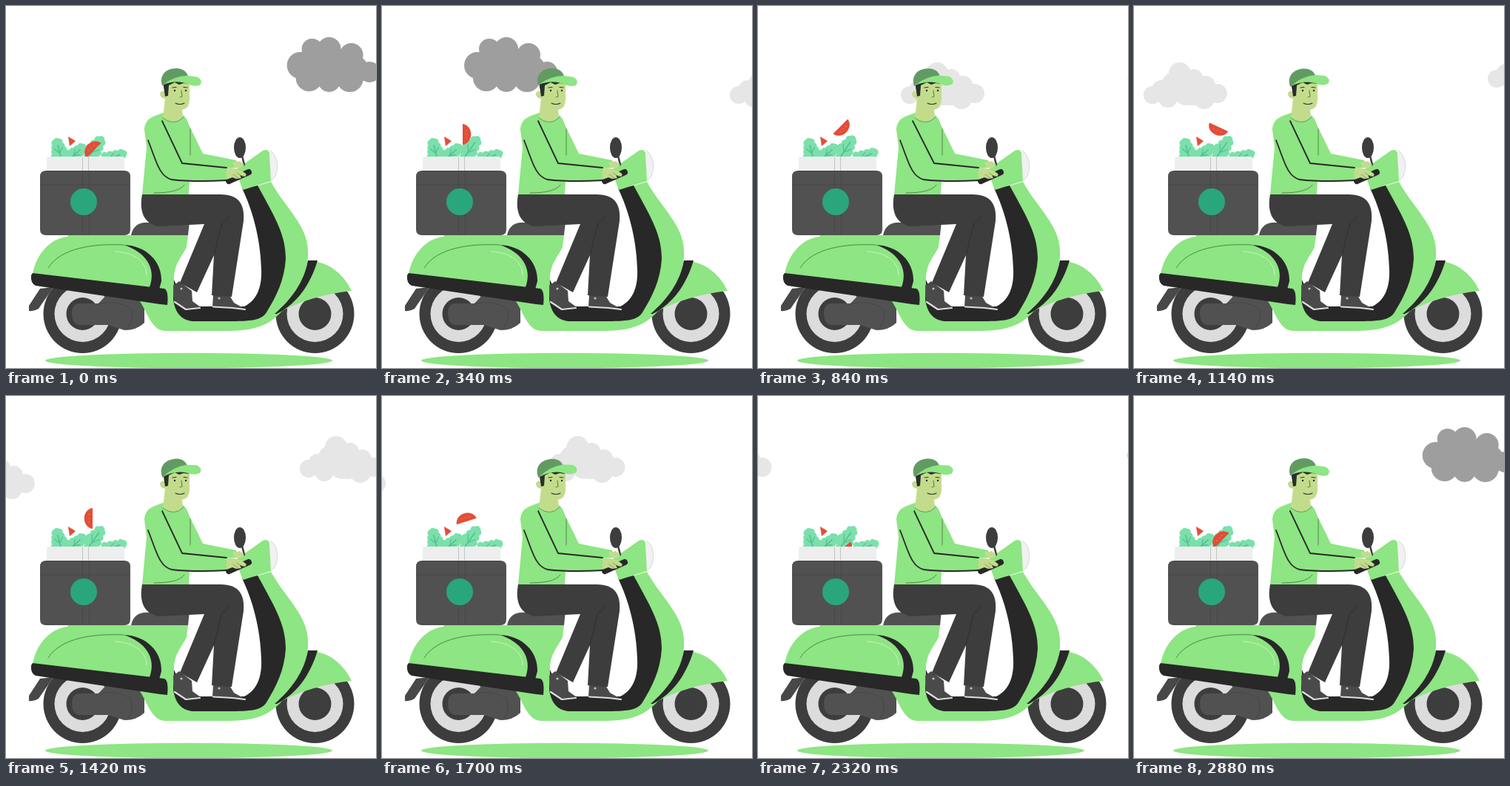
Recreate the animation shown at these times as an HTML page with a canvas. Size 500 by 488 pixels, loop 2900 ms.

```html
<!DOCTYPE html>
<html lang="en">
<head>
<meta charset="utf-8">
<title>Scooter delivery</title>
<style>
html, body { margin: 0; width: 100%; height: 100%; overflow: hidden; background: #fff; }
canvas { display: block; width: 500px; height: 488px; }
</style>
</head>
<body>
<canvas id="stage" width="500" height="488"></canvas>
<script>
const ctx = document.getElementById('stage').getContext('2d');
const LOOP = 2900;
const GREEN = '#8ee583', DARK = '#3d3d3d', BLACK = '#282828', GREY = '#515151';
const SKIN = '#c3dc8c', LEAF = '#7be0ab', RIB = '#55bd90', RED = '#e24e38', TEAL = '#2aa67c';

function fill(d, color) {
  ctx.fillStyle = color;
  ctx.fill(new Path2D(d));
}
function line(d, color, width = 1) {
  ctx.strokeStyle = color;
  ctx.lineWidth = width;
  ctx.lineCap = ctx.lineJoin = 'round';
  ctx.stroke(new Path2D(d));
}
function oval(x, y, rx, ry, color) {
  ctx.fillStyle = color;
  ctx.beginPath();
  ctx.ellipse(x, y, rx, ry, 0, 0, Math.PI * 2);
  ctx.fill();
}
const disc = (x, y, r, color) => oval(x, y, r, r, color);

function turned(x, y, deg, draw) {
  ctx.save();
  ctx.translate(x, y);
  ctx.rotate(deg * Math.PI / 180);
  draw();
  ctx.restore();
}

// Clouds: circles as [x, y, r], x measured from the left edge
const DARK_CLOUD = [[18, 80, 18], [34, 58, 14], [57, 58, 16], [87, 66, 16], [112, 89, 14],
  [30, 97, 18], [57, 101, 15], [85, 98, 18], [58, 80, 26], [90, 86, 20]];
const LIGHT_CLOUD = [[12, 98, 12], [24, 90, 12], [49, 69, 15], [68, 75, 12], [84, 85, 13],
  [100, 96, 13], [33, 102, 13], [57, 97, 15], [82, 103, 14], [44, 86, 20], [66, 92, 20]];

function cloud(parts, x, dy, color) {
  for (const [cx, cy, r] of parts) disc(x + cx, cy + dy, r, color);
}

const ease = u => u < 0.5 ? 4 * u ** 3 : 1 - 4 * (1 - u) ** 3;

// Cloud position; mid is when it is halfway, rise and fall are the lengths of each half
function drift(t, mid, rise, fall, end) {
  let d = t - mid;
  if (d > LOOP - rise) d -= LOOP;
  const u = 0.5 + d / (2 * (d < 0 ? rise : fall));
  return 500 + (end - 500) * ease(Math.min(1, Math.max(0, u)));
}

function clouds(t) {
  cloud(DARK_CLOUD, drift(t, 272, 965, 965, -150), 0, '#9e9e9e');
  cloud(LIGHT_CLOUD, drift(t, 840, 927, 1175, -114), 22, '#e6e6e6');
  cloud(LIGHT_CLOUD, drift(t, 1725, 1000, 990, -114), 0, '#e6e6e6');
}

// Tomato: [time, x, y, degrees]
const TOSS = [[0, 118, 194, -135], [340, 110, 173, 0], [840, 112, 163, 45], [1420, 116, 165, 180],
  [1980, 112, 171, 325], [2320, 115, 206, 410], [2880, 118, 194, 585], [2900, 118, 194, 585]];

function tomato(t) {
  const i = TOSS.findIndex(k => k[0] > t);
  const a = TOSS[i - 1], b = TOSS[i];
  const u = (t - a[0]) / (b[0] - a[0]);
  const [, x, y, deg] = a.map((v, j) => v + (b[j] - v) * u);
  turned(x, y, deg, () => {
    fill('M-1 -14 C14 -12 14 12 -1 14 Z', RED);
    for (const s of [-5, 0, 5]) disc(4, s, 0.7, '#f08a66');
  });
}

function leaf(x, y, len, deg, wide) {
  turned(x, y, deg, () => {
    fill(`M-5 0 L${-wide} ${-len * 0.5} L0 ${-len} L${wide} ${-len * 0.5} L5 0 Z`, LEAF);
    for (let i = 0; i < 4; i++) {
      const h = -len * (0.34 + i * 0.17), w = wide * (1 - i * 0.2);
      disc(-w, h, 4.5, LEAF);
      disc(w, h, 4.5, LEAF);
    }
    disc(0, -len + 4, 5, LEAF);
    line(`M0 0 V${-len + 9}`, RIB, 1.6);
    line(`M${-wide * 0.7} ${-len * 0.62} L0 ${-len * 0.42} L${wide * 0.7} ${-len * 0.62}`, RIB, 1.2);
  });
}

function crate(t, sway) {
  fill('M84 176 L94 182 L86 189 Z', RED);
  leaf(76, 212, 34, -14, 8);
  leaf(80, 212, 36, 48, 7);
  leaf(122, 213, 43, 69 - sway * 3, 7);
  leaf(106, 212, 43, 35 - sway * 2, 9);
  tomato(t);
  fill('M57 203 H158 Q160 203 160 205 V222 H55 V205 Q55 203 57 203 Z', '#eeeeee');
  line('M103.5 204 V222 M111.5 204 V222', '#c4c4c4');
  fill('M54 222 H160 Q168 222 168 230 V301 Q168 309 160 309 H54 Q46 309 46 301 V230 Q46 222 54 222 Z', GREY);
  line('M103.5 223 V308 M112.5 223 V308 M47 241 H167', '#454545', 0.8);
  line('M54 222.5 H160', '#3f3f3f');
  disc(105, 264, 18, TEAL);
}

function wheel(x, y) {
  disc(x, y, 53, DARK);
  disc(x, y, 38, '#dcdcdc');
  disc(x, y, 22, DARK);
}

function scooter() {
  fill('M46 381 L64 379 L44 408 Q38 412 31 411 L31 404 Z', '#484848');
  wheel(103.5, 415);
  wheel(417.5, 415);
  fill('M98 401 L125 401 L140 385 L187 385 V427 Q177 437 160 437 L138 430 H98 Q89 428 89 415 Q89 402 98 401 Z', GREY);
  line('M125 401 Q150 396 168 407 Q174 420 164 436', '#454545', 0.8);

  // Floor and front shield
  fill('M178 394 L227 368 C226 390 230 406 240 412 L300 416 L340 410 L365 345 L338 243 L358 237 '
    + 'C376 270 408 296 408 330 C409 350 402 374 383 399 C364 424 348 438 300 438 L215 438 '
    + 'C195 437 191 410 178 394 Z', GREEN);
  fill('M319 246 L340 242 C366 289 378 310 378 341 C376 370 366 390 352 413 C345 424 330 425 300 425 '
    + 'L253 425 C236 424 228 412 226 395 L227 369 L241 400 L262 405 L322 405 C341 396 346 375 345 355 '
    + 'C344 312 332 272 319 246 Z', BLACK);

  // Rear cowl
  fill('M36 362 C40 335 60 313 83 311 L84 309 H246 L244 325 C238 338 226 348 227 372 L222 400 Z', GREEN);
  fill('M159 322 C190 323 211 345 210 371 L207 382 L194 379 C204 352 187 331 159 322 Z', BLACK);
  line('M57 353 C74 326 118 320 159 322', '#3f6f3b', 0.8);
  line('M148 331 C175 333 190 345 190 363', '#d2f5cc', 0.9);
  fill('M36 360 L214 381 Q220 384 218 403 L208 402 L40 377 Q33 374 34 363 Z', BLACK);

  // Front fender
  fill('M408 343 C440 345 458 365 467 384 C430 388 395 398 366 415 C386 396 403 372 408 343 Z', GREEN);
  fill('M408 343 L421 343 C412 374 394 401 366 415 L363 415 C386 395 403 372 408 343 Z', BLACK);

  fill('M169 309 Q172 294 186 292 L248 290 L246 309 Z', GREY);
}

function steering() {
  fill('M357 195 C370 201 370 231 357 236 Z', '#f1f1f1');
  line('M357 195 C370 201 370 231 357 236', '#d0d0d0', 0.8);
  fill('M310 221 L347 195 Q354 192 356 198 L358 236 L320 248 Z', GREEN);
  line('M319 202 L322 214', DARK, 2.5);
  oval(316, 191, 8, 14, DARK);
}

function legs() {
  fill('M226 377 L234 371 L251 384 L252 398 L263 406 L242 408 L227 397 Z', '#4a4a4a');
  line('M228 399 L243 409 L262 407', '#dedede', 2.2);
  fill('M280 390 H302 L308 400 L324 409 L279 405 Z', '#4a4a4a');
  line('M280 405.5 L306 407 L323 409', '#dedede', 2.2);
  fill('M184 254 H290 C315 254 323 268 321 290 L305 392 L278 390 L281 336 L258 386 L235 373 '
    + 'L268 294 L206 297 C185 293 180 275 184 254 Z', DARK);
  line('M300 284 Q300 290 292 292 L281 336', '#2c2c2c', 0.8);
  disc(237, 381, 1.6, '#d8b5b5');
  disc(288, 394, 1.6, '#d8b5b5');
}

function torso(sway) {
  const s = sway * 2;
  fill('M212 144 C200 149 188 150 187 167 L190 190 L184 254 H247 L248 236 L298 235 V219 L313 218 '
    + 'L311 208 L266 199 L247 160 Q244 150 239 147 Z', GREEN);
  line('M249 166 V201', '#4a7d45', 0.9);
  line('M200 252 Q234 252 241 241', '#4a7d45', 0.9);
  line(`M${211 - s} 155 L238 212 L298 218`, BLACK, 1.8);
  line('M192 181 C203 209 207 230 224 234 C250 237 280 236 298 235', BLACK, 1.8);
  line('M301 236 L328 224', BLACK, 8);
  fill('M306 211 L316 209 L322 214 L316 219 L308 217 Z', SKIN);
  fill('M298 219 L308 219 Q318 220 325 227 L323 230 L316 228 L318 232 L311 233 L306 231 L298 234 Z', SKIN);
  line('M312 225 L320 230 M307 227 L314 232', '#7d8e55', 0.8);
}

function head(nod) {
  fill('M213 102 L248 104 V126 Q248 138 238 140 L239 149 Q227 162 212 150 L215 125 Q208 124 208 118 Q210 113 214 115 Z', SKIN);
  line('M212 151 Q227 163 240 150', '#5d8b52', 0.8);
  fill('M212 102 L236 95 L247 99 V105 L240 104 L234 106 L228 103 L220 107 L219 121 L215 122 Z', '#2d2d2d');
  line('M225 110 L230 109.5 M240 109.5 L245 110', '#2d2d2d', 1.2);
  disc(228, 114, 1.2, BLACK);
  disc(243, 114, 1.2, BLACK);
  line('M237 114 L238 122 L235 123', '#59663d', 0.9);
  line('M229 131 Q235 134 241 131', '#333', 1.1);
  turned(228, 104 + nod, -8 * nod, () => {
    fill('M-17 3 C-21 -12 -11 -20 2 -20 C13 -20 18 -13 18 -8 Q0 -7 -17 3 Z', '#629b62');
    fill('M-16 2 Q0 -10 18 -10 L31 -8 Q39 -3 34 3 Q26 6 17 1 Q2 -5 -16 2 Z', GREEN);
  });
}

function render(t) {
  const sway = Math.max(0, Math.cos(2 * Math.PI * (t - 840) / 1140)) ** 2;
  const nod = Math.cos(Math.PI * (t - 1750) / LOOP) ** 2;
  ctx.fillStyle = '#fff';
  ctx.fillRect(0, 0, 500, 488);
  clouds(t);
  oval(247, 478, 194, 10.3, GREEN);
  scooter();
  crate(t, sway);
  legs();
  steering();
  torso(sway);
  head(nod);
}

const start = performance.now();
function frame(now) {
  const t = Math.max(0, now - start) % LOOP;
  render(Math.floor(t / 20) * 20);
  requestAnimationFrame(frame);
}
render(0);
requestAnimationFrame(frame);
</script>
</body>
</html>
```
